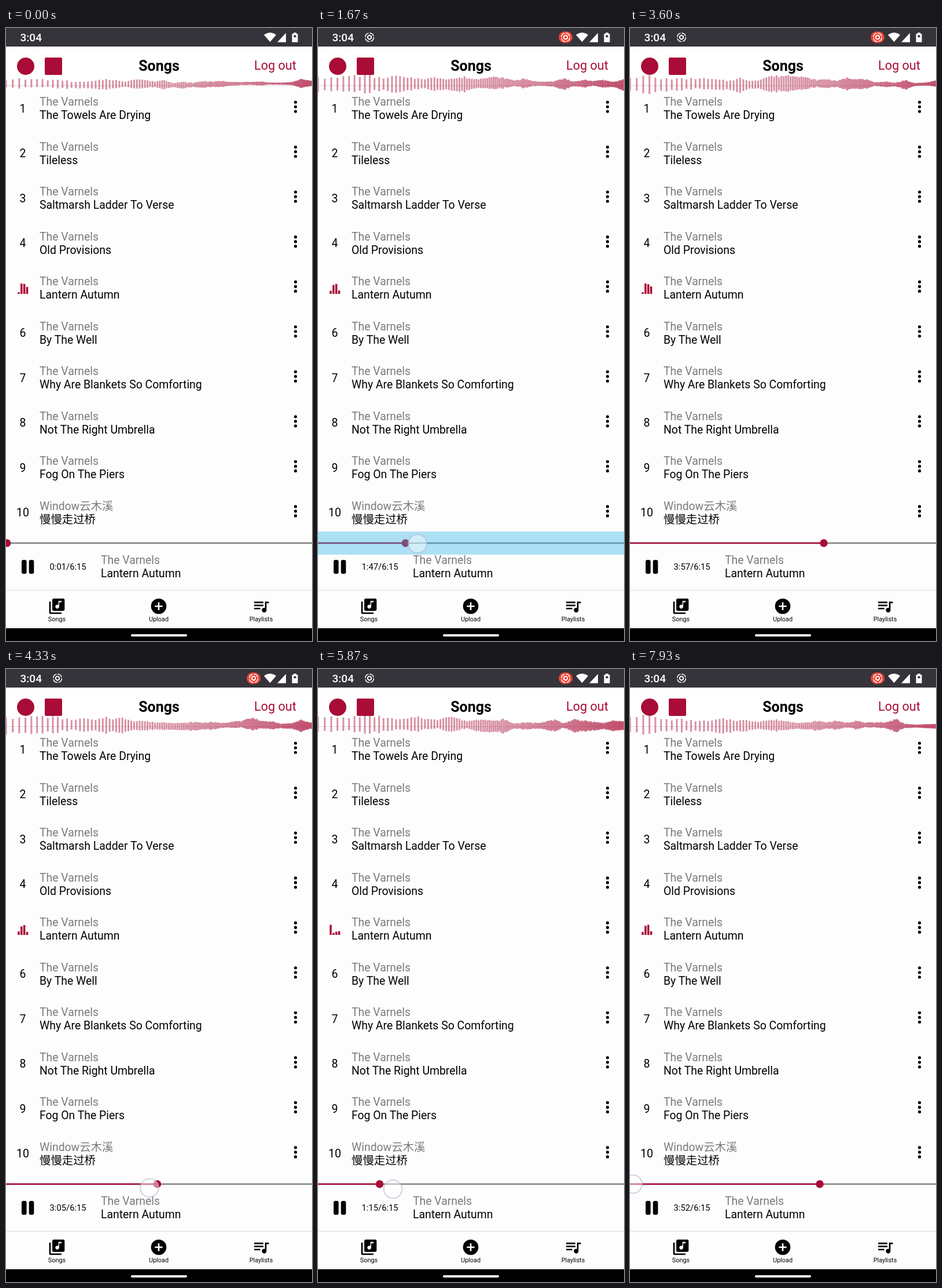
An HTML page with a canvas for the animation above (8000 ms loop, 529 by 1058 pixels).

```html
<!DOCTYPE html>
<html lang="en">
<head>
<meta charset="utf-8">
<title>Songs</title>
<style>
  html, body { margin: 0; width: 100%; height: 100%; overflow: hidden; background: #fefdfe; }
  svg, canvas { position: absolute; left: 0; top: 0; width: 100vw; height: 100vh; display: block; }
  text { font: 19.4px Roboto, "Noto Sans CJK SC", "Noto Sans CJK", sans-serif; white-space: pre; }
  .soft { fill: #7c7a7c; }
  .red { fill: #a90c36; }
</style>
</head>
<body>
<svg viewBox="0 0 529 1058">
  <rect width="529" height="32" fill="#35343a"/>
  <text x="24.5" y="23" fill="#fff" style="font-size:19px;font-weight:500">3:04</text>
  <g fill="#fff">
    <path d="M456.5 24L446 12Q456.5 4 467 12Z"/>
    <path d="M469 24.5H484V8.5Z"/>
    <path d="M497 8h5v2h2.5v14.5h-10V10h2.5ZM497.5 12.5v3.5h4v-3.5z" fill-rule="evenodd"/>
  </g>
  <g id="chip">
    <rect x="416" y="6" width="24" height="20" rx="10" fill="#ea4335"/>
    <g id="rec" fill="none" stroke="#fff" stroke-width="1.5">
      <circle cx="428" cy="16" r="7.3" stroke-dasharray="9.5 1.97"/>
      <circle cx="428" cy="16" r="3.2" stroke-width="2"/>
    </g>
    <use href="#rec" x="-339"/>
  </g>

  <rect y="32" width="529" height="67" fill="#fff"/>
  <path d="M0 99.5H529" stroke="#dcd6d9"/>
  <circle class="red" cx="34" cy="66" r="15"/>
  <rect class="red" x="67" y="51" width="30" height="30" rx="2"/>
  <text x="264.5" y="74" text-anchor="middle" style="font-size:25px;font-weight:700">Songs</text>
  <text class="red" x="429" y="72" style="font-size:21.6px">Log out</text>

  <g id="rows"></g>
  <path id="eq" class="red"/>

  <path d="M0 889H529" stroke="#808080" stroke-width="2.5"/>
  <path id="played" stroke="#a90c36" stroke-width="2.5"/>
  <circle id="thumb" class="red" cy="889" r="6.7"/>
  <rect x="27" y="918" width="8.6" height="24" rx="3"/>
  <rect x="39.7" y="918" width="8.6" height="24" rx="3"/>
  <text id="clock" x="75.5" y="935" style="font-size:14.8px"></text>
  <text class="soft" x="164" y="925">The Varnels</text>
  <text x="164" y="948">Lantern Autumn</text>

  <path d="M0 970.5H529" stroke="#ddd"/>
  <g id="tabs"></g>
  <rect y="1036" width="529" height="22"/>
  <rect x="216" y="1046.3" width="97" height="4" rx="2" fill="#fff"/>

  <rect id="press" y="869" width="529" height="40" fill="rgba(51,181,229,.4)"/>
  <circle id="touch" r="15.8" fill="rgba(255,255,255,.45)" stroke="rgba(178,190,212,.65)" stroke-width="2"/>
</svg>
<canvas id="wave" width="529" height="1058"></canvas>

<script>
const $ = id => document.getElementById(id);
const LOOP = 8000, TICK = 200 / 3, LENGTH = 375, W = 529, LAG = 95;

const songs = ['The Towels Are Drying', 'Tileless', 'Saltmarsh Ladder To Verse', 'Old Provisions',
  'Lantern Autumn', 'By The Well', 'Why Are Blankets So Comforting', 'Not The Right Umbrella',
  'Fog On The Piers', '慢慢走过桥'];

$('rows').innerHTML = songs.map((title, i) => {
  const number = i === 4 ? '' : `<text x="29" y="145.5" text-anchor="middle">${i + 1}</text>`;
  const dots = [128, 136, 144].map(y => `<circle cx="500.5" cy="${y}" r="2.6"/>`).join('');
  return `<g transform="translate(0 ${i * 77.55})">${number}
    <text class="soft" x="58" y="134">${i === 9 ? 'Window云木溪' : 'The Varnels'}</text>
    <text x="58" y="157">${title}</text>${dots}</g>`;
}).join('');

const note = 'v5.5a2.5 2.5 0 1 1-1-2V5h4v2z';
const tabs = [
  ['Songs', 88, `M20 2H8a2 2 0 0 0-2 2v12a2 2 0 0 0 2 2h12a2 2 0 0 0 2-2V4a2 2 0 0 0-2-2zM18 7h-3${note}M4 6H2v14a2 2 0 0 0 2 2h14v-2H4z`],
  ['Upload', 264, 'M12 2a10 10 0 1 0 0 20a10 10 0 1 0 0-20zM17 13h-4v4h-2v-4H7v-2h4V7h2v4h4z'],
  ['Playlists', 441, 'M3 6h12v2H3zM3 10h12v2H3zM3 14h8v2H3zM17 6v8.18A3 3 0 1 0 19 17V8h3V6z']
];
$('tabs').innerHTML = tabs.map(([name, x, d]) =>
  `<path transform="translate(${x - 16} 982) scale(1.333)" fill-rule="evenodd" d="${d}"/>
   <text x="${x}" y="1024" text-anchor="middle" style="font-size:10.9px">${name}</text>`).join('');

const mix = (a, b, k) => a + (b - a) * k;
const clamp = k => Math.min(1, Math.max(0, k));

// Finger path as [time, x, y]; the thumb trails it by LAG.
const path = [[0, 1.7, 889], [900, 5, 889], [1667, 172, 890], [2420, 335, 896], [3720, 335, 896],
  [4933, 163, 895], [5600, 65, 897], [6600, 307, 900], [7000, 395, 903], [7440, 202, 908], [7933, 358, 928]];

function finger(t) {
  const i = Math.max(1, path.findIndex(p => p[0] >= t));
  const [a, b] = [path[i - 1], path[i]];
  const k = clamp((t - a[0]) / (b[0] - a[0]));
  return [mix(a[1], b[1], k), mix(a[2], b[2], k)];
}

// Smooth seeded noise on a unit grid, 0 to 1.
const rand = (a, b) => {
  const n = Math.sin(a * 12.9898 + b * 78.233) * 43758.5453;
  return n - Math.floor(n);
};
function noise(x, y) {
  const i = Math.floor(x), j = Math.floor(y);
  const row = r => mix(rand(i, r), rand(i + 1, r), x - i);
  return mix(row(j), row(j + 1), y - j);
}

const ctx = $('wave').getContext('2d');

function drawWave(t) {
  const beat = t / 150;
  const loud = Math.min(1, .6 + t / 2000);
  ctx.clearRect(0, 70, W, 60);
  ctx.fillStyle = 'rgba(169,12,54,.45)';
  for (let i = 0; i < 157; i++) {
    // Logarithmic frequency axis: wide gaps on the left, overlap on the right.
    const x = 245 * Math.log(1 + i * 12 / 245);
    const lump = noise(x / 17, beat);
    const floor = .65 - .5 * x / W;
    const h = loud * mix(18, 13, x / W) * mix(lump * lump, 1, floor) * mix(.8, 1.1, rand(i, 7));
    const mid = 97 + 5 * (noise(x / 60 + 50, beat) - .5);
    ctx.fillRect(x - 1.5, mid - h, 3, 2 * h);
  }
}

// Four bars bounce on one cycle, each with its own peak.
function drawEqualizer(t) {
  $('eq').setAttribute('d', [.5, 0, .93, .22].map((peak, i) => {
    const h = 10.5 + 7.5 * Math.cos(2 * Math.PI * (t / 894 - peak));
    return `M${20.2 + i * 4.85} 459v${-h}h3.5v${h}z`;
  }).join(''));
}

function drawSlider(t) {
  const [x] = finger(t - LAG);
  const s = Math.floor(x / W * LENGTH);
  $('played').setAttribute('d', `M0 889H${x}`);
  $('thumb').setAttribute('cx', x);
  $('clock').textContent = `${Math.floor(s / 60)}:${String(s % 60).padStart(2, '0')}/6:15`;
}

function drawTouch(t) {
  const [x, y] = finger(t);
  const show = (id, on) => $(id).style.display = on ? '' : 'none';
  $('touch').setAttribute('cx', x);
  $('touch').setAttribute('cy', y);
  show('touch', t >= 900 && t < 3400 || t >= 3720);
  show('press', t >= 1000 && t < 1760);
}

function draw(now) {
  const t = Math.floor((now % LOOP + 5) / TICK) * TICK;
  $('chip').style.opacity = clamp((t - 700) / 300);
  drawWave(t);
  drawEqualizer(t);
  drawSlider(t);
  drawTouch(t);
}

const start = performance.now();
function frame() {
  draw(performance.now() - start);
  requestAnimationFrame(frame);
}
frame();
</script>
</body>
</html>
```
